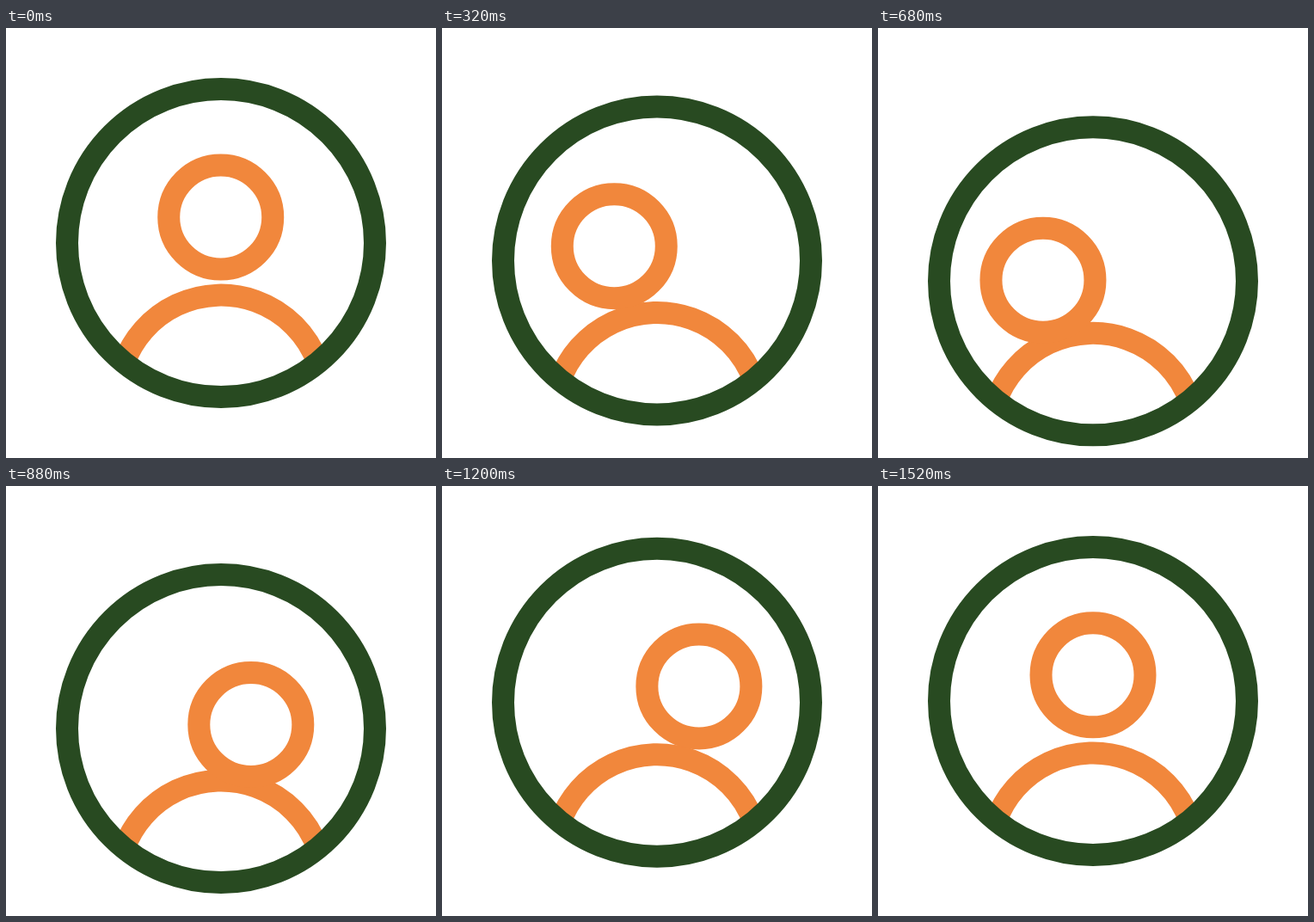
Animation of 500x500 px, one loop 2000 ms. Source, as an HTML page with a canvas:

```html
<!DOCTYPE html>
<html lang="en">
<head>
<meta charset="utf-8">
<title>Rolling head avatar</title>
<style>
  html, body { margin: 0; width: 100%; height: 100%; overflow: hidden; background: #fff; }
  canvas { display: block; width: 500px; height: 500px; }
</style>
</head>
<body>
<canvas id="stage" width="500" height="500"></canvas>
<script>
const ctx = document.getElementById("stage").getContext("2d");
const LOOP = 2000, STEP = 40;
const GREEN = "#284a21", ORANGE = "#f1873c";

// Eased progress from 0 to 1 between two times
function ease(t, start, end) {
  const s = Math.min(1, Math.max(0, (t - start) / (end - start)));
  return s * s * (3 - 2 * s);
}

function strokeArc(x, y, radius, color, from = 0, to = 2 * Math.PI) {
  ctx.beginPath();
  ctx.arc(x, y, radius, from, to);
  ctx.strokeStyle = color;
  ctx.stroke();
}

function draw(t) {
  const drop = ease(t, -20, 700);
  const frameY = 44.5 * (drop - ease(t, 671, 1271));
  const headY = 73.8 * (drop - ease(t, 655, 1400));
  const headX = -82 * ease(t, -20, 575) + 152 * ease(t, 565, 1023) - 70 * ease(t, 1025, 1505);

  ctx.fillStyle = "#fff";
  ctx.fillRect(0, 0, 500, 500);
  ctx.lineWidth = 26;
  strokeArc(250, 430.5 + frameY, 120, ORANGE, Math.PI + 0.344, 2 * Math.PI - 0.344);
  strokeArc(250 + headX, 219.8 + headY, 60.5, ORANGE);
  strokeArc(250, 250 + frameY, 179, GREEN);
}

const began = performance.now();
function tick() {
  const t = (performance.now() - began) % LOOP;
  draw(Math.floor(t / STEP) * STEP);
  requestAnimationFrame(tick);
}
tick();
</script>
</body>
</html>
```
